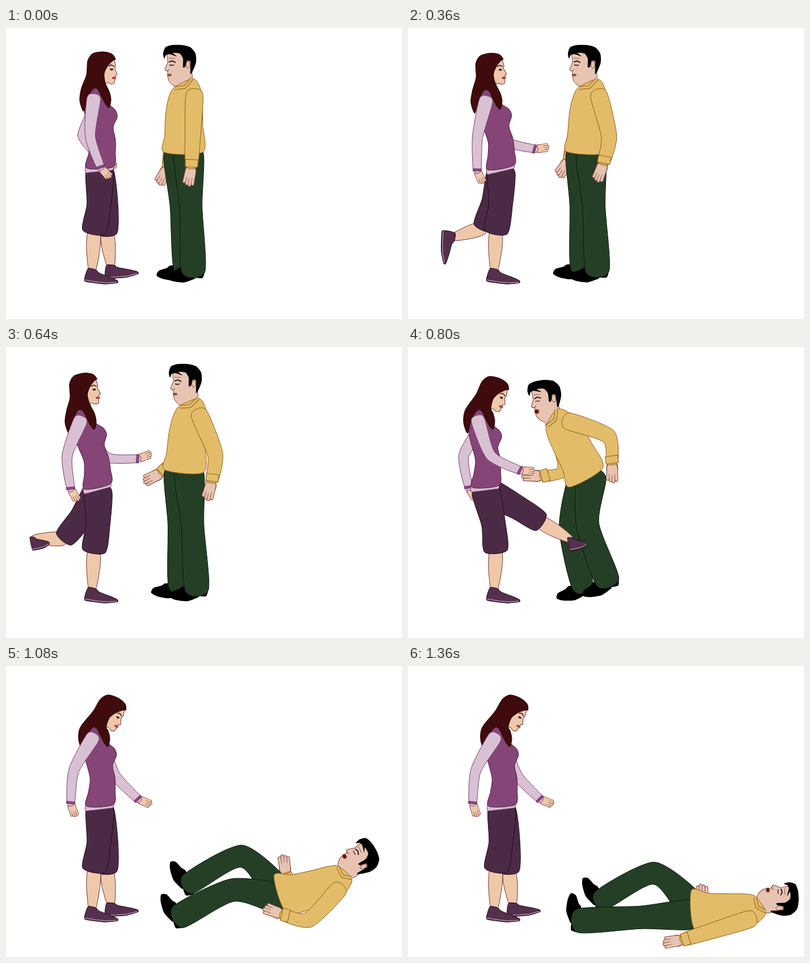
Write an HTML page with a canvas that moves like this. It is 698x513 px and loops after 1560 ms.

```html
<!DOCTYPE html>
<html lang="en">
<head>
<meta charset="utf-8">
<title>Kick</title>
<style>
html, body { margin: 0; width: 100%; height: 100%; overflow: hidden; background: #fff; }
canvas { display: block; }
</style>
</head>
<body>
<canvas id="stage" width="698" height="513"></canvas>
<script>
const ctx = document.getElementById('stage').getContext('2d');
const LOOP = 1560, STEP = 40;

const HER = {
  facing: 1, skin: '#efc8aa', skinLine: '#6a3434', sleeve: '#d9c1d4', edge: '#7a3a6c', cuff: '#87477a',
  vest: '#854577', shorts: '#4b2a45', dark: '#1e0a1a', shoe: '#54304c', hair: '#400b0c',
  upper: 67, fore: 58, thigh: 105, shin: 55, armWidth: [12, 9, 6.5], cuffSize: 4, hand: 1, wristBend: -.42
};
const HIM = {
  facing: -1, skin: '#e7c3b2', skinLine: '#7c4036', sleeve: '#e3bc69', edge: '#8c5a18', cuff: '#e3bc69',
  trousers: '#243f26', dark: '#0a170b',
  upper: 76, fore: 47, thigh: 85, shin: 100, armWidth: [15, 13.5, 10], cuffSize: 13, hand: 1.4, wristBend: .15
};

// ---- key poses: only the spine ends, head tilt, wrists and ankles -------
function pose(actor, t, parts) {
  actor.tracks ??= {};
  for (const name in parts) (actor.tracks[name] ??= []).push([t, parts[name]]);
}

function hold(actor, t) {
  for (const track of Object.values(actor.tracks)) track.push([t, track.at(-1)[1]]);
}

pose(HER, 120, { neck: [159,109], hip: [165,246], turn: [0], near: [167,246], far: [172,235], foot: [185,421] });
pose(HER, 240, { neck: [145,111], hip: [165,246], turn: [-.1], near: [128,252], far: [217,226], foot: [95,384] });
pose(HER, 520, { neck: [133,114], hip: [161,246], turn: [-.12], near: [114,250], far: [233,197], foot: [59,349] });
pose(HER, 600, { foot: [47,338] });
hold(HER, 640);
pose(HER, 680, { foot: [72,378] });
pose(HER, 760, { foot: [295,308] });
pose(HER, 800, { neck: [127,114], hip: [136,246], turn: [.35], near: [198,218], far: [107,248], foot: [286,339] });
pose(HER, 960, { neck: [157,111], hip: [165,246], turn: [.46], near: [117,242], far: [229,235], foot: [185,421] });
pose(HER, 1080, { near: [114,242], far: [233,235] });

pose(HIM, 120, { neck: [312,98], hip: [313,219], turn: [0], mouth: [0], slump: [0],
  near: [327,244], far: [286,245], footN: [330,423], footF: [314,419] });
pose(HIM, 240, { neck: [313,98], near: [331,239], far: [292,240], footF: [305,418] });
pose(HIM, 520, { neck: [322,98], hip: [314,219], near: [363,236], far: [274,222], footN: [336,422] });
hold(HIM, 640);
pose(HIM, 800, { neck: [253,125], hip: [314,230], turn: [-.15], mouth: [1],
  near: [360,204], far: [236,228], footN: [350,408], footF: [307,418] });
pose(HIM, 960, { neck: [411,150], hip: [414,270], turn: [.05], slump: [10],
  near: [461,271], far: [344,247], footN: [341,416], footF: [306,400] });
pose(HIM, 1080, { neck: [597,364], hip: [483,402], turn: [1],
  near: [487,438], far: [493,368], footN: [309,440], footF: [326,382] });
pose(HIM, 1360, { neck: [621,420], hip: [502,430], turn: [1.5], slump: [8], mouth: [.6],
  near: [484,483], far: [520,420], footN: [305,449], footF: [344,411] });

const mix = (a, b, u) => a.map((v, i) => v + (b[i] - v) * u);

function sample(track, t) {
  const i = track.findIndex(key => key[0] > t);
  if (i === 0) return track[0][1];
  if (i < 0) return track.at(-1)[1];
  const [t0, a] = track[i - 1], [t1, b] = track[i];
  const u = (t - t0) / (t1 - t0);
  return mix(a, b, t0 >= 1080 ? 1 - (1 - u) ** 3.5 : u); // settles on the floor
}

// The actor's look plus every track's value at time t.
function at(actor, t) {
  const f = { slump: [0], ...actor };
  for (const name in actor.tracks) f[name] = sample(actor.tracks[name], t);
  return f;
}

// ---- skeleton -----------------------------------------------------------
// Point at share u of the spine, moved forward by d.
function spot(f, u, d) {
  const [x, y] = mix(f.neck, f.hip, u);
  const dx = f.hip[0] - f.neck[0], dy = f.hip[1] - f.neck[1];
  const push = (d - 4 * u * (1 - u) * f.slump[0]) * f.facing / Math.hypot(dx, dy);
  return [x + dy * push, y - dx * push];
}

const body = (f, rows) => rows.flatMap(([u, d]) => spot(f, u, d));

// Two-bone joint; bones stretch when the end is out of reach.
function joint(a, b, l1, l2, side) {
  const dx = b[0] - a[0], dy = b[1] - a[1], d = Math.hypot(dx, dy);
  const k = Math.max(1, d / (l1 + l2));
  const along = ((l1 * l1 - l2 * l2) * k * k + d * d) / (2 * d);
  const out = side * Math.sqrt(Math.max(0, (l1 * k) ** 2 - along ** 2));
  return [a[0] + (dx * along - dy * out) / d, a[1] + (dy * along + dx * out) / d];
}

const heading = (a, b) => Math.atan2(b[1] - a[1], b[0] - a[0]);
const shifted = ([x, y], a, d) => [x + Math.cos(a) * d, y + Math.sin(a) * d];

// ---- drawing helpers ----------------------------------------------------
function paint(fill, stroke, width = 1) {
  if (fill) { ctx.fillStyle = fill; ctx.fill(); }
  if (stroke) { ctx.strokeStyle = stroke; ctx.lineWidth = width; ctx.stroke(); }
}

// Smooth closed outline through flat x,y pairs.
function blob(p, fill, stroke, k = .14) {
  const n = p.length, v = i => p[(i + n) % n];
  ctx.beginPath();
  ctx.moveTo(p[0], p[1]);
  for (let i = 0; i < n; i += 2) {
    const out = j => v(j) + (v(j + 2) - v(j - 2)) * k;
    const back = j => v(j + 2) - (v(j + 4) - v(j)) * k;
    ctx.bezierCurveTo(out(i), out(i + 1), back(i), back(i + 1), v(i + 2), v(i + 3));
  }
  ctx.closePath();
  paint(fill, stroke);
}

function line(p, stroke, width = 1) {
  ctx.beginPath();
  for (let i = 0; i < p.length; i += 2) ctx.lineTo(p[i], p[i + 1]);
  paint(null, stroke, width);
}

function oval(x, y, rx, ry, fill, stroke) {
  ctx.beginPath();
  ctx.ellipse(x, y, rx, ry, 0, 0, 7);
  paint(fill, stroke);
}

function within([x, y], angle, draw, sx = 1, sy = sx) {
  ctx.save();
  ctx.translate(x, y);
  ctx.rotate(angle);
  ctx.scale(sx, sy);
  draw();
  ctx.restore();
}

// Tapered limb through three points with half widths w.
function limb(a, b, c, w, fill, stroke) {
  const turns = [heading(a, b), heading(a, c), heading(b, c)];
  const side = s => [a, b, c].map((p, i) => shifted(p, turns[i] + s * Math.PI / 2, w[i]));
  const cap = shifted(a, turns[0], -w[0] * .7);
  blob([cap, ...side(-1), ...side(1).reverse()].flat(), fill, stroke, .12);
}

function hand(f) {
  const fingers = [0, 1, 2, 3].map(i => {
    const y = (i - 1.5) * 3.3;
    return [7, y, 24 - Math.abs(i - 1.2) * 2, y * 1.1];
  });
  ctx.lineCap = 'round';
  fingers.forEach(p => line(p, f.skinLine, 4.4));
  oval(7, 0, 9, 7, f.skin, f.skinLine);
  fingers.forEach(p => line(p, f.skin, 3));
  ctx.lineCap = 'butt';
}

function arm(f, shoulder, wrist, reach = 1, bend = f.wristBend) {
  const elbow = joint(shoulder, wrist, f.upper * reach, f.fore * reach, f.facing);
  const a = heading(elbow, wrist), w = f.armWidth[2] + 1;
  within(wrist, a + bend, () => hand(f), f.hand);
  limb(shoulder, elbow, wrist, f.armWidth, f.sleeve, f.edge);
  within(wrist, a, () => {
    ctx.beginPath();
    ctx.rect(1 - f.cuffSize, -w, f.cuffSize, w * 2);
    paint(f.cuff, f.edge);
  });
}

// ---- woman --------------------------------------------------------------
const herBody = [[0, -7], [0, 7], [.18, 20], [.27, 32], [.36, 35], [.49, 27], [.65, 30], [.81, 29], [1, 24],
  [1, -23], [.81, -18], [.63, -14], [.31, -22], [.1, -20]];
// Hair around the head, then the loose ends; both measured from the neck.
const hairCap = [22,-29, 7,-49, 34,-54, 28,-63, 13,-67, -6,-64, -15,-51, -17,-27].filter((v, i) => i < 2 || i > 5);
const hairEnds = [-26,-3, -29,19, -22,38, -16,16, -7,0, 2,-2, 11,15, 17,26, 23,31, 26,17, 23,3];
const hairline = [16,-12, 14,-29, 21,-43, 30,-52];

function herShoe(ankle, turn, length) {
  within(ankle, turn, () => {
    blob([-7,-4, 6,-2, 12,3, 30,9, 45,15, 45,19, 25,22, 5,21, -12,19, -12,10], HER.shoe, HER.dark, .1);
    line([-12,17, 8,19, 26,20, 44,18], '#d8b4cc');
  }, length, 1);
}

function herFace() {
  blob([17,-52, 31,-53, 34,-43, 33,-37, 37,-27, 33,-25, 35,-21, 33,-18, 32,-12, 27,-10, 18,-13,
    15,-3, 4,-3, 7,-39], HER.skin, HER.skinLine, .08);
  line([22,-42, 27,-44, 32,-41], HER.dark, 1.4);
  oval(27, -36, 3, 1.7, '#3a2028');
  oval(31, -21, 3, 2, '#a83848');
}

function herLeg(hip, knee, ankle, hem) {
  limb(knee, mix(knee, ankle, .4), ankle, [11, 12, 6], HER.skin, HER.skinLine);
  const bend = heading(knee, ankle) - Math.PI / 2;
  herShoe(ankle, Math.max(-.35, bend * 1.2), bend < -.3 ? .55 : 1);
  const [x, y] = mix(hip, knee, .55);
  limb(hip, [x + 4, y], knee, [24, 21, hem], HER.shorts, HER.dark);
}

function drawWoman(t) {
  const f = at(HER, t), hip = spot(f, 1.05, 0);
  const [c, s] = [Math.cos(f.turn[0]), Math.sin(f.turn[0])];
  const [nx, ny] = f.neck;
  const tilted = p => p.map((v, i) => i % 2 ? ny + p[i - 1] * s + v * c : nx + v * c - p[i + 1] * s);
  const hung = p => p.map((v, i) => v + f.neck[i % 2]);

  arm(f, spot(f, .16, 7), f.far);
  herLeg(hip, joint(hip, f.foot, f.thigh, f.shin, -1), f.foot, 17);
  herLeg(hip, [155,360], [152,428], 20);
  blob(body(f, [[.97, 24], [1.04, 23], [1.06, -25], [.97, -24]]), f.sleeve, f.edge, .03);
  blob(body(f, herBody), f.vest, '#4a1c44');
  within(f.neck, f.turn[0], herFace);
  blob([...tilted([34,-54, 28,-63, 13,-67, -6,-64, -15,-51, -17,-27]), ...hung(hairEnds), ...tilted(hairline)],
    f.hair, '#1c0204');
  arm(f, spot(f, .11, -5), f.near);
}

// ---- man ----------------------------------------------------------------
const hisBody = [[.06, 16], [.22, 26], [.45, 31], [.75, 33], [1, 34], [1, -34], [.6, -34], [.3, -34],
  [.06, -30], [-.07, -17]];

function hisHead(open) {
  blob([-27,-54, -27,-38, -32,-25, -27,-21, -27,-14, -25,-5, -19,2, -12,6, -12,12, 1,10, 16,-8,
    14,-38, 6,-56], HIM.skin, HIM.skinLine, .08);
  blob([-35,-53, -31,-64, -19,-68, -2,-68, 13,-64, 22,-53, 23,-38, 18,-24, 13,-17, 13,-38, 7,-40,
    4,-30, 0,-29, 0,-44, -6,-53, -18,-54, -11,-48, -24,-52, -30,-50, -33,-44], '#000', null, .12);
  oval(9, -33, 3.5, 6, HIM.skin, HIM.skinLine);
  line([-25,-38, -19,-40, -13,-37], '#000', 1.6);
  line([-24,-33, -20,-32 - open, -16,-33], '#2a1010', 1.8 - open * .7);
  line([-25,-45, -14,-44], HIM.skinLine, .8);
  line([-31,-24, -27,-22, -24,-25], HIM.skinLine);
  oval(-24, -15, 3.8, 1.6 + open * 2, open > .5 ? '#6a1c1c' : '#a04a40', HIM.skinLine);
}

function hisLeg(f, hip, ankle, w) {
  const knee = joint(hip, ankle, f.thigh, f.shin, 1), a = heading(knee, ankle);
  within(ankle, a - Math.PI / 2 + .12, () =>
    blob([-22,1, 18,0, 18,16, 5,17, 4,19, -15,27, -35,26, -47,21, -44,12, -30,6], '#000', null, .12));
  limb(hip, knee, shifted(ankle, a, 7), w, f.trousers, f.dark);
}

function drawMan(t) {
  const f = at(HIM, t);
  arm(f, spot(f, .22, 5), f.far, .9, .35);
  hisLeg(f, spot(f, 1.03, 9), f.footF, [26, 19.5, 18]);
  hisLeg(f, spot(f, 1.03, -9), f.footN, [26, 20, 20.5]);
  within(f.neck, f.turn[0], () => hisHead(f.mouth[0]));
  blob(body(f, hisBody), f.sleeve, f.edge);
  const collar = body(f, [[-.07, -16], [.05, -3], [.07, 15]]);
  line(collar, f.edge, 6);
  line(collar, f.sleeve, 4);
  arm(f, spot(f, .16, -20), f.near);
}

ctx.lineJoin = 'round';

function frame() {
  const t = Math.floor(performance.now() % LOOP / STEP) * STEP;
  ctx.fillStyle = '#fff';
  ctx.fillRect(0, 0, 698, 513);
  drawMan(t);
  drawWoman(t);
  requestAnimationFrame(frame);
}
frame();
</script>
</body>
</html>
```
